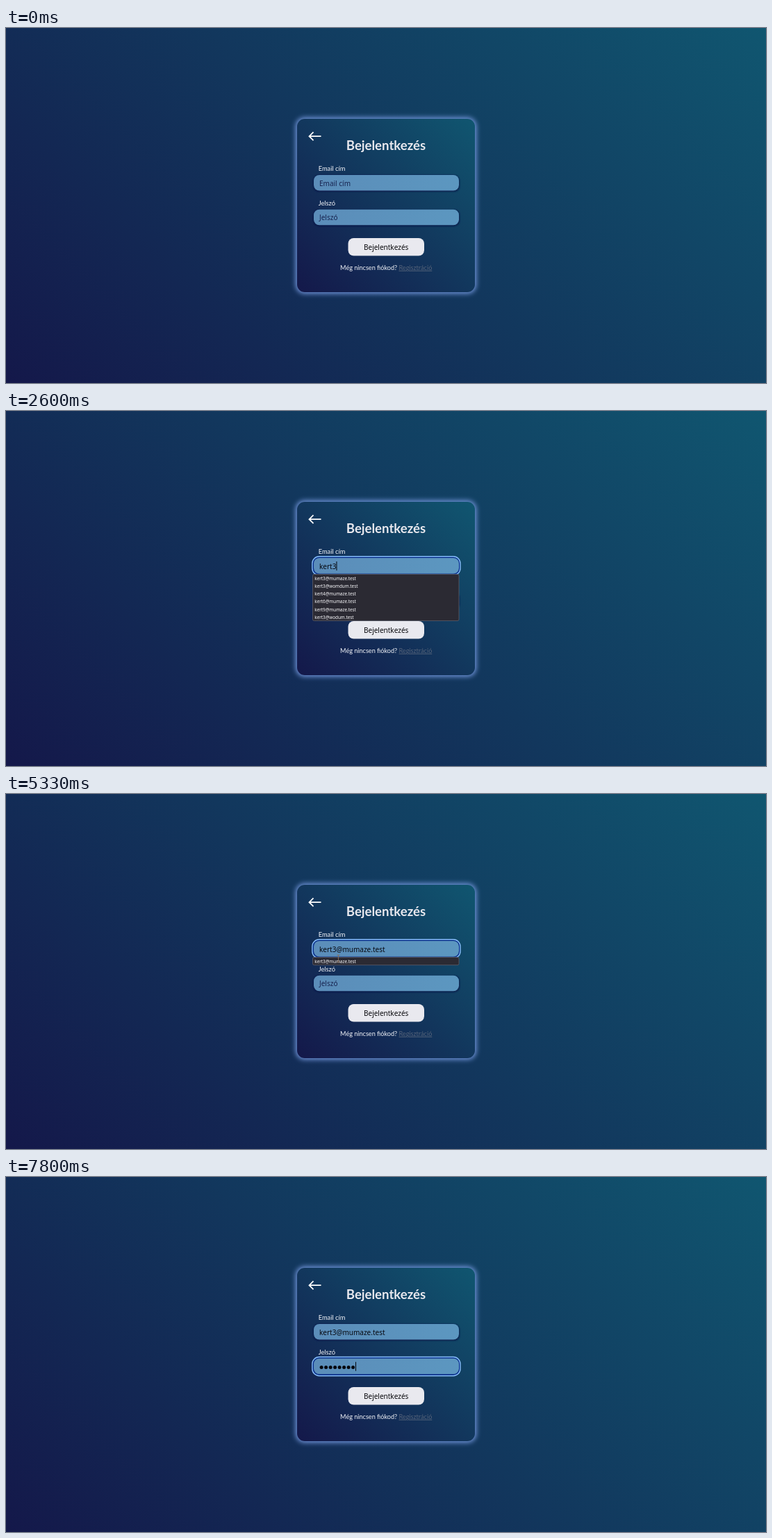
Animation, 1094 px wide and 512 px high, one loop 8 s. Source, as an HTML page:

```html
<!DOCTYPE html>
<html lang="hu">
<head>
<meta charset="utf-8">
<title>Bejelentkezés</title>
<style>
  html, body { margin: 0; width: 100%; height: 100%; overflow: hidden; background: #12375d; }
  svg { display: block; width: 100vw; height: 100vh; }
  text { white-space: pre; font-variant-ligatures: none; }
  .title { font: bold 18.6px Lato, sans-serif; fill: #e8e8ee; text-anchor: middle; }
  .label { font: 9.3px Lato, sans-serif; fill: #f4f6fa; }
  .foot { font: 9.1px Lato, sans-serif; fill: #f4f6fa; text-anchor: middle; }
  .link { fill: #56647a; text-decoration: underline; }
  .input { font: 10px "Noto Sans", sans-serif; fill: #06080f; }
  .hint { fill: #17234f; }
  .button { font: 10px "Noto Sans", sans-serif; fill: #08080c; text-anchor: middle; }
  .option { font: 6.3px "Noto Sans", sans-serif; fill: #fbfbfe; }
</style>
</head>
<body>
<svg viewBox="0 0 1094 512">
  <defs>
    <linearGradient id="page" gradientUnits="userSpaceOnUse" x1="145.5" y1="657.5" x2="948.5" y2="-145.5">
      <stop offset="0" stop-color="#14184a"/><stop offset="1" stop-color="#105670"/>
    </linearGradient>
    <linearGradient id="card" gradientUnits="userSpaceOnUse" x1="420.5" y1="382.5" x2="673.5" y2="129.5">
      <stop offset="0" stop-color="#14184a"/><stop offset="1" stop-color="#105670"/>
    </linearGradient>
    <linearGradient id="field">
      <stop offset="0" stop-color="#5b8db9"/><stop offset="1" stop-color="#5c97c0"/>
    </linearGradient>
    <filter id="glow" x="-20%" y="-20%" width="140%" height="140%"><feGaussianBlur stdDeviation="3.6"/></filter>
    <filter id="soft" x="-10%" y="-40%" width="120%" height="180%"><feGaussianBlur stdDeviation="1"/></filter>
  </defs>

  <rect width="1094" height="512" fill="url(#page)"/>
  <rect x="417" y="129" width="260" height="254" rx="13" fill="#7397de" filter="url(#glow)"/>
  <rect x="419" y="131" width="256" height="250" rx="11" fill="url(#card)"/>
  <path d="M453.5 156.2H436.5M442.5 150.2L436.5 156.2L442.5 162.2" fill="none" stroke="#fff" stroke-width="1.8"/>
  <text class="title" x="547" y="176">Bejelentkezés</text>

  <text class="label" x="449.7" y="206">Email cím</text>
  <text class="label" x="449.7" y="255.7">Jelszó</text>
  <g id="fields"></g>

  <rect x="492.5" y="303" width="109.5" height="25.5" rx="8" fill="#e9e9ef"/>
  <text class="button" x="547.2" y="320.2">Bejelentkezés</text>
  <text class="foot" x="547.2" y="348.8">Még nincsen fiókod? <tspan class="link">Regisztráció</tspan></text>

  <g id="list">
    <rect id="panel" x="441.5" y="235.5" width="210.5" rx="2" fill="#2b2a33" stroke="#5f5e68" stroke-width=".8"/>
    <rect id="hover" x="442" y="236" width="209.5" height="10.4" fill="#52525e"/>
    <g id="options"></g>
  </g>
  <path id="beam" d="M-2 0H2M0 0V10M-2 10H2" fill="none" stroke="#86705f" stroke-width="1"/>
  <path id="arrow" d="M0 0V10.5L2.4 8.3L4 11.8L5.5 11.1L4 7.7H7.3Z" fill="#fff" stroke="#111" stroke-width=".6"/>
</svg>
<script>
const LOOP = 8000;
const LEFT = 451;
const DOT = 6.5;
const NS = 'http://www.w3.org/2000/svg';
const $ = id => document.getElementById(id);

const EMAIL = 'kert3@mumaze.test';
const OPTIONS = [EMAIL, 'kert3@womdum.test', 'kert4@mumaze.test',
  'kert6@mumaze.test', 'kert9@mumaze.test', 'kert3@wodum.test'];
const EMAIL_KEYS = [1730, 1870, 1930, 2070, 2600, 2930, 3130, 3400, 3530,
  3670, 3930, 4070, 4270, 4400, 4470, 4530, 4600];
const PASSWORD_KEYS = [6730, 7000, 7070, 7270, 7470, 7600, 7670, 7800];

function add(parent, tag, attrs, text = '') {
  const el = document.createElementNS(NS, tag);
  for (const key in attrs) el.setAttribute(key, attrs[key]);
  el.textContent = text;
  parent.append(el);
  return el;
}

const show = (el, on) => el.setAttribute('visibility', on ? 'visible' : 'hidden');
const between = (t, a, b) => t >= a && t < b;
const typed = (keys, t) => keys.filter(k => k <= t).length;

function makeField(y, hint) {
  const g = $('fields');
  add(g, 'rect', { x: 442.5, y: y + .3, width: 210.5, height: 23.7, rx: 8, fill: '#071447', filter: 'url(#soft)', opacity: .8 });
  const ring = add(g, 'g', { fill: '#0b318c' });
  add(ring, 'rect', { x: 440.8, y: y - 2.2, width: 213.2, height: 27.2, rx: 10, stroke: '#86bdf8', 'stroke-width': 1.4 });
  add(g, 'rect', { x: 443, y, width: 209, height: 22.6, rx: 8, fill: 'url(#field)' });
  return {
    ring,
    hint: add(g, 'text', { class: 'input hint', x: LEFT, y: y + 15.7 }, hint),
    value: add(g, 'text', { class: 'input', x: LEFT, y: y + 15.7 }),
    caret: add(g, 'rect', { y: y + 5, width: 1, height: 13, fill: '#05070d' })
  };
}

const email = makeField(212, 'Email cím');
const password = makeField(261.7, 'Jelszó');
const dots = PASSWORD_KEYS.map((_, i) =>
  add($('fields'), 'circle', { cx: LEFT + 3.1 + DOT * i, cy: 274.6, r: 2.5, fill: '#06080f' }));

function paintField(field, focused, empty, caretOn, width) {
  show(field.ring, focused);
  show(field.hint, empty);
  show(field.caret, caretOn);
  field.caret.setAttribute('x', LEFT + width);
}

let listed = '';
function paintList(t) {
  show($('list'), between(t, 1800, 5800));
  const items = t < 2670 ? OPTIONS
    : t < 3200 ? OPTIONS.filter(s => s.startsWith('kert3'))
    : [EMAIL];
  if (listed === items.join()) return;
  listed = items.join();
  $('panel').setAttribute('height', 11.17 * items.length);
  $('options').replaceChildren();
  items.forEach((s, i) => add($('options'), 'text', { class: 'option', x: 444.3, y: 244 + 11.15 * i }, s));
}

// Pointer tip, or null while it is hidden by typing
function pointerAt(t) {
  const step = start => Math.floor((t - start) / 66.7 + .05) * 66.7;
  if (between(t, 70, 1730)) {
    const p = Math.min(1, step(70) / 730);
    const rest = (1 - p) ** 2;
    return [488.5 + 600 * rest, 225 + 278 * rest];
  }
  if (between(t, 5070, 6730)) {
    if (t < 5330) return [476.5, 225];
    const p = Math.min(1, (step(5330) + 67) / 330);
    return [476.5 + 9.5 * p, 225 + 36 * p];
  }
  return null;
}

function paintPointer(t) {
  const at = pointerAt(t);
  const inField = at && at[0] > 443 && at[0] < 652 &&
    (between(at[1], 212, 235) || between(at[1], 261, 284));
  const onList = at && between(t, 5330, 5600) && between(at[1], 235, 247);
  show($('beam'), at && inField);
  show($('arrow'), at && !inField);
  $('hover').setAttribute('opacity', onList ? 1 : 0);
  if (at) for (const id of ['beam', 'arrow']) $(id).setAttribute('transform', `translate(${at})`);
}

function paint(t) {
  const text = EMAIL.slice(0, typed(EMAIL_KEYS, t));
  if (email.value.textContent !== text) email.value.textContent = text;
  const width = text ? email.value.getComputedTextLength() : 0;
  paintField(email, between(t, 1270, 5800), !text,
    between(t, 1270, 5130) || between(t, 5600, 5800), width);

  const count = typed(PASSWORD_KEYS, t);
  dots.forEach((dot, i) => show(dot, i < count));
  paintField(password, t >= 5800, !count,
    between(t, 5800, 6400) || t >= 6730, DOT * count);

  paintList(t);
  paintPointer(t);
}

const start = performance.now();
function frame() {
  paint((performance.now() - start) % LOOP);
  requestAnimationFrame(frame);
}
frame();
</script>
</body>
</html>
```
